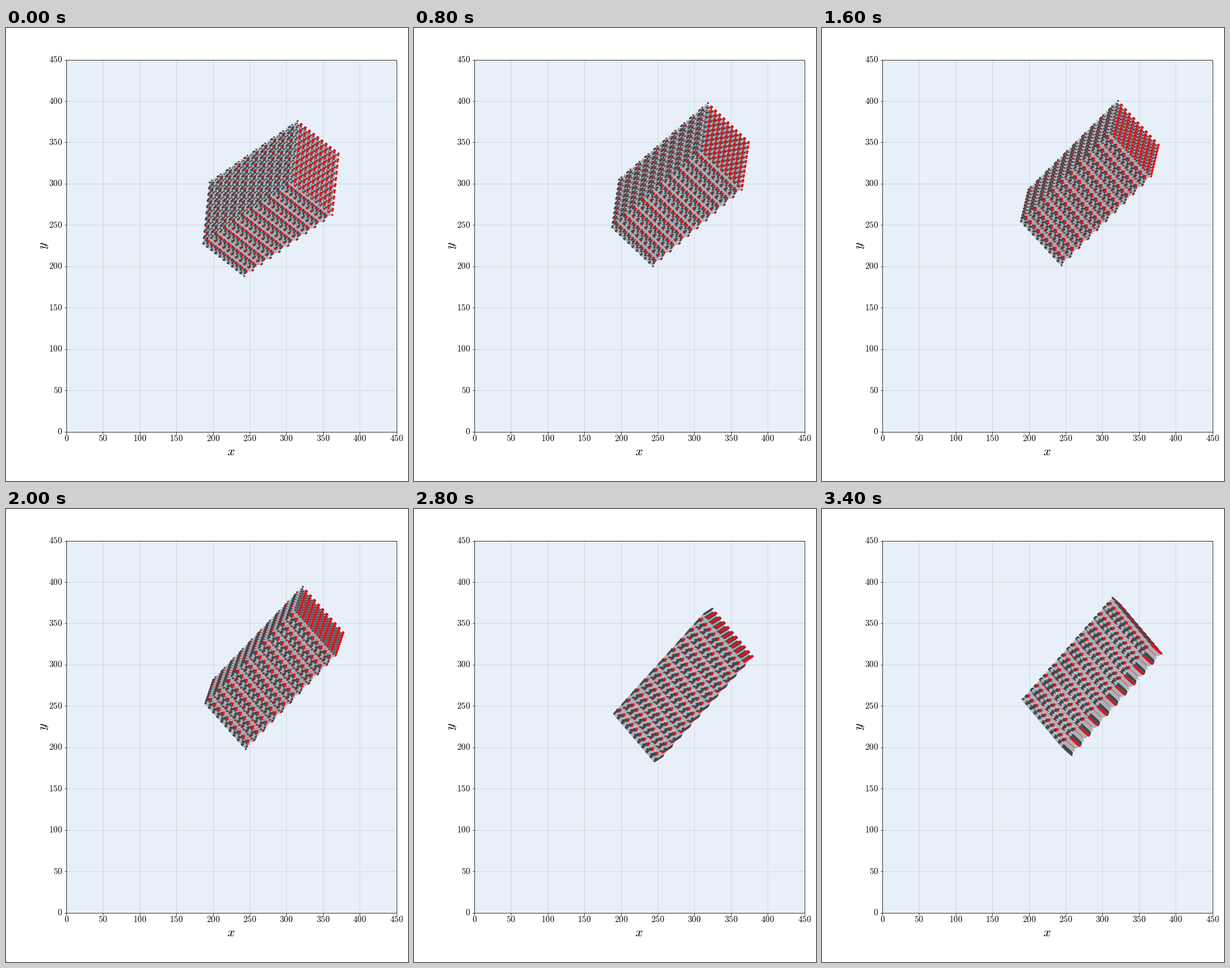
Recreate the animation shown at these times as a matplotlib script. Size 706 px wide and 794 px high, loop 3.6 s.

```python
from itertools import product

import numpy as np
import matplotlib.pyplot as plt
from matplotlib.animation import FuncAnimation
from matplotlib.colors import to_rgba_array

W, H, DPI = 706, 794, 72
FRAMES, STEP_MS = 18, 200
LEFT, RIGHT, TOP, BOTTOM = 106, 685.6, 55.6, 707.6
CELLS = 10
DARK, LIGHT, RED = "#42474c", "#adb2b8", "#e8101a"
DIAMETER = {DARK: 3.4, LIGHT: 3.2, RED: 3.7}

plt.rcParams["mathtext.fontset"] = "cm"


def make_cell():
    """Fractional positions and colours of the atoms in one unit cell."""
    oxygen = [(.98, .95, .30), (.88, .97, .15), (.08, .40, .50),
              (.38, .60, .94), (.52, .53, .96)]
    corners = list(product((.12, .98), (.08, .98), (.03, .97)))
    steps = np.arange(1, 47)[:, None]
    filler = .03 + .94 * ((steps * np.array([.81917, .67104, .54970])) % 1)
    a, b, c = filler.T
    wave = np.cos(2 * np.pi * (b - a - .25))
    wave += .8 * np.cos(2 * np.pi * (2 * c + a + 2 * b))
    colors = [RED] * len(oxygen)
    colors += [RED if p[0] > .5 and p[1] > .5 else DARK for p in corners]
    colors += [DARK if x > .4 else LIGHT for x in wave]
    return np.vstack([oxygen, corners, filler]), colors


def make_crystal():
    """Atoms of the outer cells, in edge units centred on the block."""
    grid = np.indices((CELLS,) * 3).reshape(3, -1).T
    i, j, k = grid.T
    last = CELLS - 1
    shell = grid[(i == 0) | (i == last) | (j == last) | (k >= last - 1)]
    spots, colors = make_cell()
    atoms = (shell[:, None, :] + spots[None]).reshape(-1, 3) / CELLS - .5
    areas = np.array([DIAMETER[c] ** 2 for c in colors])
    copies = len(shell)
    return 1.01 * atoms, np.tile(to_rgba_array(colors), (copies, 1)), np.tile(areas, copies)


def edges(n):
    """Projected edge vectors (x, y down, depth) after n three-degree turns."""
    tu, tv, tw = np.radians(np.array([47.3, 53.0, 45.6]) - 3 * n)
    u = (72.5 - .1 * n, 84 * np.cos(tu), -84 * np.sin(tu))
    v = (154.5 + .5 * n - .018 * n * n, -178 * np.cos(tv), 178 * np.sin(tv))
    w = (-11.2 - .25 * n, 150 * np.sin(tw), 150 * np.cos(tw))
    return np.array([u, v, w])


def center(n):
    x = 464.4 + .7 * n - .01 * n * n
    y = 270.4 + .68 * (n - 6.5) ** 2 if n < 15 else 313.5 - 10 * (n - 15)
    return np.array([x, y])


fig = plt.figure(figsize=(W / DPI, H / DPI), dpi=DPI, facecolor="white")

plot = fig.add_axes([LEFT / W, 1 - BOTTOM / H, (RIGHT - LEFT) / W, (BOTTOM - TOP) / H])
plot.set(xlim=(0, 450), ylim=(0, 450), facecolor="#e7f0f8")
ticks = range(0, 451, 50)
plot.set_xticks(ticks, [])
plot.set_yticks(ticks, [])
plot.grid(color="#b0b0b0", alpha=.5, linewidth=.8)
plot.set_axisbelow(True)

stage = fig.add_axes([0, 0, 1, 1])
stage.set(xlim=(0, W), ylim=(H, 0))
stage.axis("off")

for t in ticks:
    x = LEFT + (RIGHT - LEFT) * t / 450
    y = BOTTOM - (BOTTOM - TOP) * t / 450
    stage.text(x, 719.3, f"${t}$", size=15, ha="center", va="center")
    stage.text(99, y, f"${t}$", size=15, ha="right", va="center")
stage.text(395, 742.8, "$x$", size=23, ha="center", va="center")
stage.text(65.5, 381, "$y$", size=23, ha="center", va="center", rotation=90)

atoms, colors, areas = make_crystal()
dots = stage.scatter(atoms[:, 0], atoms[:, 1], s=areas, c=colors, linewidths=0)


def draw(n):
    points = atoms @ edges(n)
    order = np.argsort(points[:, 2])
    dots.set_offsets(points[order, :2] + center(n))
    dots.set_facecolors(colors[order])
    dots.set_sizes(areas[order], DPI)
    return (dots,)


anim = FuncAnimation(fig, draw, frames=FRAMES, interval=STEP_MS,
                     repeat=True, repeat_delay=0)
plt.show()
```
